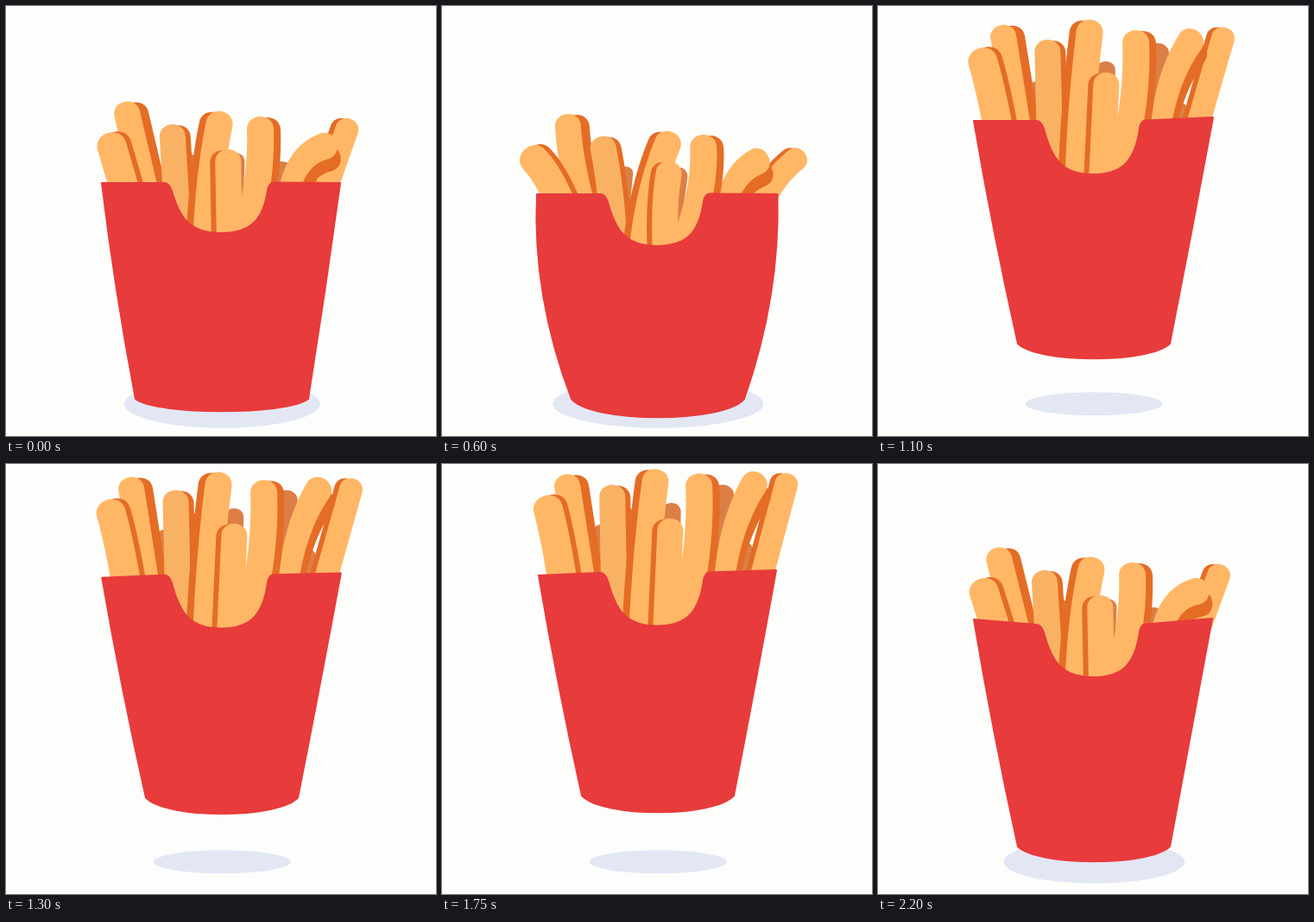
Animation, 498 px wide and 498 px high, one loop 2250 ms. Source, as an HTML page with a canvas:

```html
<!DOCTYPE html>
<html lang="en">
<head>
<meta charset="utf-8">
<title>Jumping fries</title>
<style>
  html, body { margin: 0; width: 100%; height: 100%; overflow: hidden; background: #fdfefc; }
  canvas { display: block; width: 498px; height: 498px; }
</style>
</head>
<body>
<canvas id="stage" width="498" height="498"></canvas>
<script>
const ctx = document.getElementById('stage').getContext('2d');
const LOOP = 2250, STEP = 50;
const PAPER = '#fdfefc', RED = '#e83b3b', FACE = '#ffb766', DIM = '#f9b263',
      SIDE = '#e56c25', BACK = '#dc7f47', SHADOW = '#e3e7f4';

// Poses: landing, squash, leap, stretch, hover, falling
const TIMES = [0, 600, 850, 1100, 1750, 2200];
const N = TIMES.length;

// Smooth looping curve through one value per pose, without overshoot
function track(values) {
  const gap = i => (i === N - 1 ? LOOP : TIMES[i + 1]) - TIMES[i];
  const slope = i => (values[(i + 1) % N] - values[i]) / gap(i);
  const tangents = values.map((_, i) => {
    const p = (i + N - 1) % N, a = slope(p), b = slope(i);
    if (a * b <= 0) return 0;
    const mean = (a * gap(i) + b * gap(p)) / (gap(p) + gap(i));
    return Math.sign(a) * Math.min(Math.abs(mean), 3 * Math.abs(a), 3 * Math.abs(b));
  });
  return t => {
    let i = N - 1;
    while (TIMES[i] > t) i--;
    const h = gap(i), u = (t - TIMES[i]) / h, v = 1 - u, j = (i + 1) % N;
    return v * v * (1 + 2 * u) * values[i] + u * u * (3 - 2 * u) * values[j]
      + h * u * v * (v * tangents[i] - u * tangents[j]);
  };
}

const box = {
  left:   track([110, 109, 110, 110, 111, 110]),
  right:  track([388, 389.5, 389, 389, 388, 388]),
  topL:   track([204, 217, 133, 132, 128, 179]),
  topR:   track([204, 217, 131, 128, 122, 178]),
  rim:    track([205, 218, 142, 133, 126, 186]),
  notch:  track([262, 277, 203, 194, 186.5, 246]),
  corner: track([455, 455, 400, 391, 384, 443]),
  bottom: track([470, 477, 416, 409, 404, 461]),
  half:   track([101, 101, 89, 89, 89, 89]),
  bulge:  track([1, 22, -1, 0, 0, 0])
};
const shadowX = track([113.5, 122, 80.5, 79.5, 79.5, 105]);
const shadowY = track([28, 28, 14.5, 13.5, 13.5, 25]);

// Tips are given for the first five poses; bend for landing, squash and the air
function fry({ w, wb = w, base, depth = 20, side, color = side ? FACE : BACK, x, y, bend = [0, 0, 0] }) {
  const [land, squash, air] = bend;
  return {
    w, wb, base, depth, side, color,
    x: track([...x, x[0]]),
    y: track([...y, y[0] - 14]),
    bend: track([land, squash, air, air, air, land])
  };
}

const fries = [
  fry({ w: 18, base: 186, x: [184, 184, 183, 184, 184], y: [215, 230, 114, 87, 70] }),
  fry({ w: 16, base: 208, depth: 30, x: [211, 214, 212, 213, 214], y: [170, 186, 90, 66, 50] }),
  fry({ w: 22, base: 262, depth: 60, x: [266, 275, 267, 264, 266], y: [170, 187, 100, 64, 45] }),
  fry({ w: 26, base: 318, x: [320, 318, 320, 325, 326], y: [180, 218, 75, 43, 24] }),
  fry({ w: 16, base: 350, x: [346, 350, 350, 350, 352], y: [225, 235, 140, 112, 91] }),

  fry({ w: 27, base: 366, side: [-6, 0], x: [399, 420, 403, 403, 402],
        y: [131, 170, 40, 25, 11], bend: [0, 11, 0] }),
  fry({ w: 31, wb: 23, base: 326, side: [4, 14], x: [383, 378, 371, 370, 369],
        y: [158, 174, 53, 29, 11], bend: [28, 20, 17] }),
  fry({ w: 30, base: 164, side: [10, 1], x: [137, 145, 144, 143, 143],
        y: [111, 125, 38, 22, 12], bend: [0, 6, 0] }),
  fry({ w: 34, base: 141, side: [6, -1], x: [118, 96, 117, 117, 119],
        y: [147, 166, 65, 49, 37], bend: [0, -8, -3] }),
  fry({ w: 30, base: 200, depth: 65, side: [6, 1], color: DIM, x: [192, 184, 197, 196, 197],
        y: [137, 151, 56, 39, 24], bend: [0, -5, 0] }),
  fry({ w: 31, base: 232, depth: 65, side: [-8, 1], x: [250, 267, 245, 247, 249],
        y: [122, 146, 46, 16, 6], bend: [6, 10, 4] }),
  fry({ w: 30, base: 259, depth: 70, side: [-6, 1], x: [257, 265, 263, 265, 265],
        y: [166, 180, 92, 77, 63], bend: [0, 6, 0] }),
  fry({ w: 31, base: 279, depth: 60, side: [8, 1], x: [294, 302, 298, 298, 297],
        y: [128, 149, 46, 28, 11], bend: [-10, -15, -13] })
];

// Bent strip with a rounded tip
function strip(f, t, [ox, oy], color) {
  const bx = f.base + ox, by = box.rim(t) + f.depth + oy;
  const tx = f.x(t) + ox, ty = f.y(t) + oy;
  const dx = tx - bx, dy = ty - by, len = Math.hypot(dx, dy) || 1, k = f.bend(t) / len;
  const cx = (bx + tx) / 2 + dy * k, cy = (by + ty) / 2 - dx * k;
  const reach = Math.hypot(tx - cx, ty - cy) || 1;
  const ux = (tx - cx) / reach, uy = (ty - cy) / reach;
  const cap = f.w * 0.48, ex = tx - ux * cap, ey = ty - uy * cap;

  const edge = (u, s) => {
    const v = 1 - u, gx = v * (cx - bx) + u * (ex - cx), gy = v * (cy - by) + u * (ey - cy);
    const h = s * (f.wb * v + f.w * u) / 2 / (Math.hypot(gx, gy) || 1);
    return [v * v * bx + 2 * u * v * cx + u * u * ex + gy * h,
            v * v * by + 2 * u * v * cy + u * u * ey - gx * h];
  };
  const parts = 14, px = ux * cap * 4 / 3, py = uy * cap * 4 / 3;
  const [lx, ly] = edge(1, 1), [rx, ry] = edge(1, -1);

  ctx.beginPath();
  for (let i = 0; i <= parts; i++) ctx.lineTo(...edge(i / parts, 1));
  ctx.bezierCurveTo(lx + px, ly + py, rx + px, ry + py, rx, ry);
  for (let i = parts; i >= 0; i--) ctx.lineTo(...edge(i / parts, -1));
  ctx.fillStyle = color;
  ctx.fill();
}

function drawBox(t) {
  const b = {};
  for (const key in box) b[key] = box[key](t);
  const midY = (b.topL + b.corner) / 2;
  const low = b.corner + (b.bottom - b.corner) * 4 / 3 - 1;
  const dip = b.rim + (b.notch - b.rim) * 0.72;
  const footL = 251 - b.half, footR = 249 + b.half;

  ctx.beginPath();
  ctx.moveTo(b.left + 1, b.topL + 1);
  ctx.lineTo(183, b.rim);
  ctx.quadraticCurveTo(189, b.rim, 192, b.rim + 9);
  ctx.bezierCurveTo(201, dip, 213, b.notch + 1, 249, b.notch + 1);
  ctx.bezierCurveTo(285, b.notch + 1, 298, dip, 303, b.rim + 9);
  ctx.quadraticCurveTo(304, b.rim, 310, b.rim - 0.5);
  ctx.lineTo(b.right - 1, b.topR + 1);
  ctx.quadraticCurveTo((b.right + footR) / 2 + b.bulge, midY, footR, b.corner);
  ctx.bezierCurveTo(footR - 24, low, footL + 24, low, footL, b.corner);
  ctx.quadraticCurveTo((b.left + footL) / 2 - b.bulge - 3, midY, b.left + 1, b.topL + 1);
  ctx.closePath();
  ctx.fillStyle = ctx.strokeStyle = RED;
  ctx.lineWidth = 2;
  ctx.lineJoin = 'round';
  ctx.fill();
  ctx.stroke();
}

function draw(t) {
  ctx.fillStyle = PAPER;
  ctx.fillRect(0, 0, 498, 498);

  ctx.beginPath();
  ctx.ellipse(250.3, 460.7, shadowX(t), shadowY(t), 0, 0, Math.PI * 2);
  ctx.fillStyle = SHADOW;
  ctx.fill();

  for (const f of fries) {
    if (f.side) strip(f, t, f.side, SIDE);
    strip(f, t, [0, 0], f.color);
  }
  drawBox(t);
}

function tick(now) {
  draw(Math.floor((now % LOOP) / STEP) * STEP);
  requestAnimationFrame(tick);
}
draw(0);
requestAnimationFrame(tick);
</script>
</body>
</html>
```
